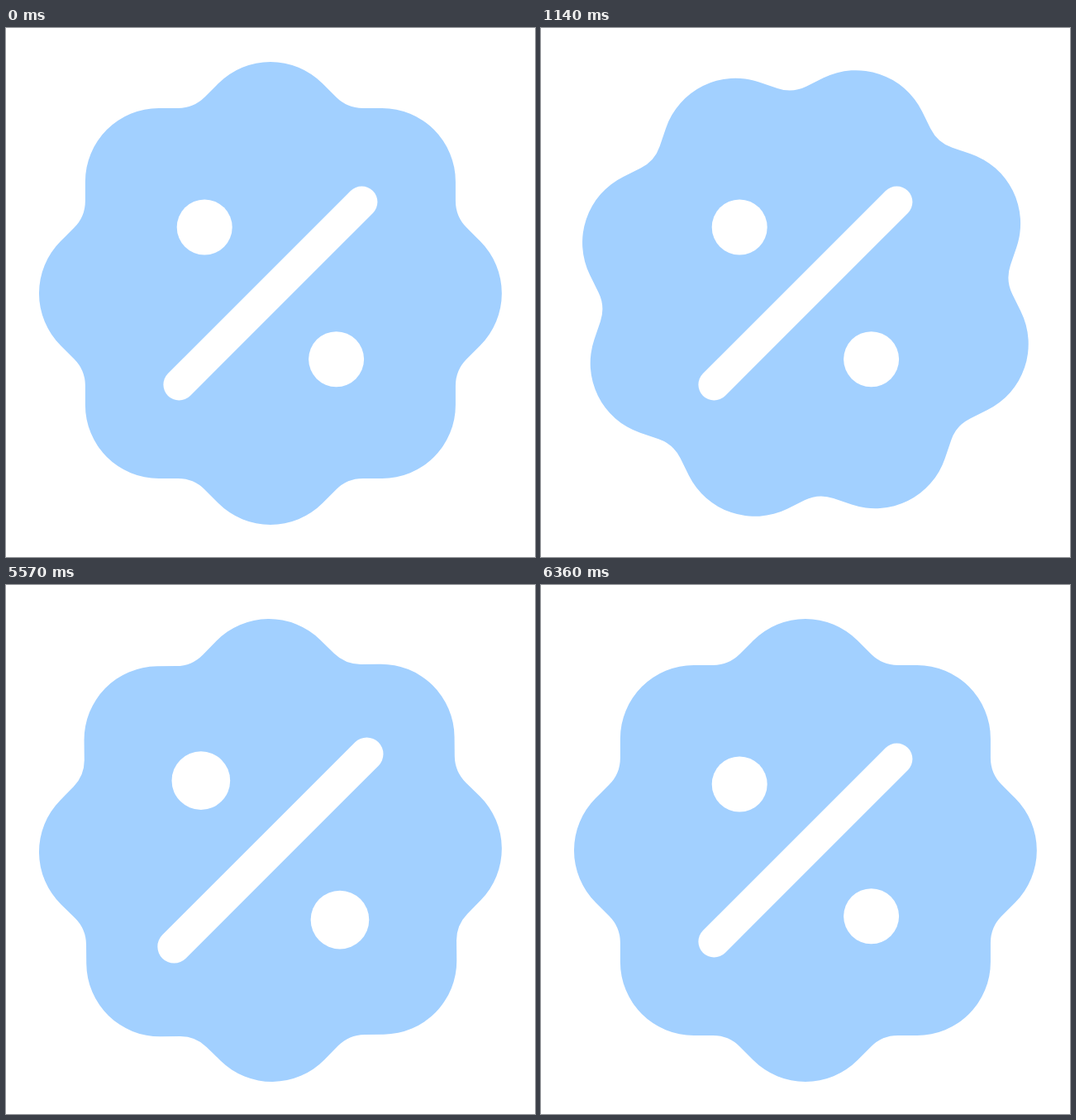
These frames come from a looping animation (640x640 px, 9570 ms). An HTML page:

```html
<!DOCTYPE html>
<html lang="en">
<head>
<meta charset="utf-8">
<title>Discount badge</title>
<style>
  html, body { margin: 0; width: 100%; height: 100%; overflow: hidden; background: #fff; }
  svg { display: block; width: 100%; height: 100%; }
</style>
</head>
<body>
<svg viewBox="0 0 640 640">
  <g transform="translate(319.9 321)">
    <path id="badge" fill="#a2d0ff"/>
    <g id="percent" fill="#fff">
      <path d="M-110.5 110.5 110.5 -110.5" stroke="#fff" stroke-width="38" stroke-linecap="round"/>
      <circle cx="-79.7" cy="-80" r="33.5"/>
      <circle cx="79.7" cy="79.7" r="33.5"/>
    </g>
  </g>
</svg>
<script>
  const LOOP = 9570;
  const FRAME = 1000 / 14;
  const SPIN = 1092;
  const PULSE = 860;
  const LEAD = 15; // the percent sign swells just before the badge turns
  const STARTS = [297, 5263.5];

  const badge = document.getElementById('badge');
  const percent = document.getElementById('percent');

  // Eight round lobes joined by short straight flanks and filleted valleys
  function badgePath() {
    const lobe = 89, valley = 46;
    const lobePoint = [62.9, -253.9], valleyPoint = [79.4, -237.4];
    let d = '';
    for (let i = 0; i < 8; i++) {
      const c = Math.cos(i * Math.PI / 4), s = Math.sin(i * Math.PI / 4);
      const at = ([x, y], side) =>
        `${(side * x * c - y * s).toFixed(2)} ${(side * x * s + y * c).toFixed(2)}`;
      d += i ? `A${valley} ${valley} 0 0 0 ` : 'M';
      d += `${at(valleyPoint, -1)}L${at(lobePoint, -1)}`;
      d += `A${lobe} ${lobe} 0 0 1 ${at(lobePoint, 1)}L${at(valleyPoint, 1)}`;
    }
    return d + `A${valley} ${valley} 0 0 0 ${-valleyPoint[0]} ${valleyPoint[1]}Z`;
  }

  function bezier(x1, y1, x2, y2) {
    const curve = (a, b, s) => 3 * a * s * (1 - s) ** 2 + 3 * b * s * s * (1 - s) + s ** 3;
    return x => {
      if (x <= 0) return 0;
      if (x >= 1) return 1;
      let lo = 0, hi = 1;
      for (let i = 0; i < 30; i++) {
        const mid = (lo + hi) / 2;
        if (curve(x1, x2, mid) < x) lo = mid; else hi = mid;
      }
      return curve(y1, y2, lo);
    };
  }

  const spinEase = bezier(0.55, 0, 0.45, 1);
  const pulseEase = bezier(0.5, 0, 0.8, 0.4);

  function draw(now) {
    const time = now % LOOP;
    const t = Math.floor((time + 5) / FRAME) * FRAME; // 14 poses a second
    const start = t < STARTS[1] - LEAD ? STARTS[0] : STARTS[1];
    const angle = 360 * spinEase((t - start) / SPIN);
    const since = t - start + LEAD;
    const scale = since < 0 ? 1 : 1 + 0.06 * (1 - pulseEase(since / PULSE));
    badge.setAttribute('transform', `rotate(${angle})`);
    percent.setAttribute('transform', `scale(${scale})`);
  }

  badge.setAttribute('d', badgePath());
  const origin = performance.now();
  (function tick() {
    draw(performance.now() - origin);
    requestAnimationFrame(tick);
  })();
</script>
</body>
</html>
```
